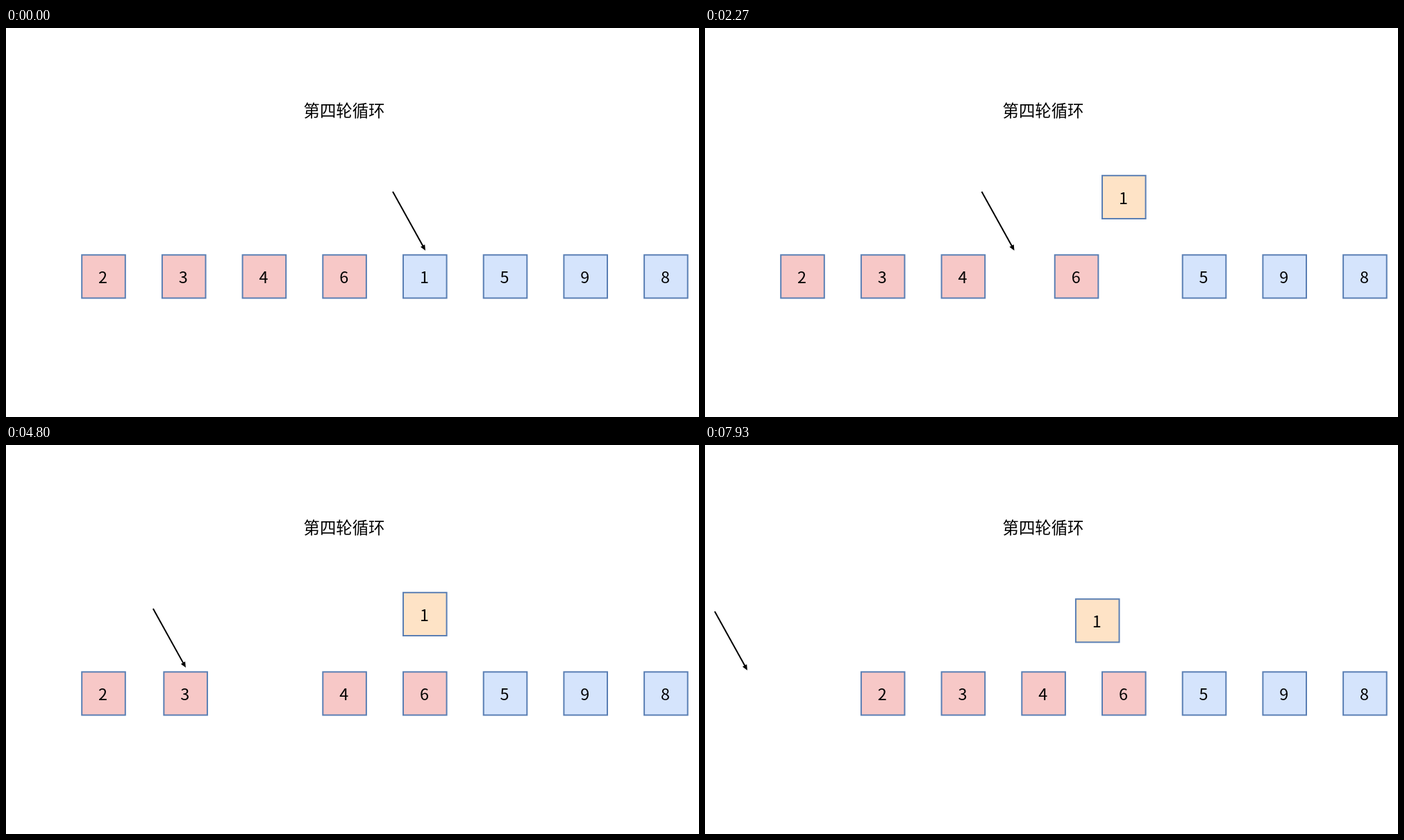
An HTML page for the animation above (8 s loop, 998x561 px).

```html
<!DOCTYPE html>
<html lang="zh-CN">
<head>
<meta charset="utf-8">
<style>
  html, body { margin: 0; width: 100%; height: 100%; overflow: hidden; background: #fff; }
  svg { display: block; width: 998px; height: 561px; }
  text { font: 23.4px "Noto Sans CJK SC", "Noto Sans CJK", sans-serif; text-anchor: middle; }
  rect { stroke: #5a7fb4; stroke-width: 2; }
</style>
</head>
<body>
<svg viewBox="0 0 998 561">
  <text x="487" y="128.2">第四轮循环</text>
  <g id="boxes"></g>
  <g id="arrow">
    <path d="M0 0L43.5 78.6" stroke="#000" stroke-width="2"/>
    <path d="M47 85L46.2 76.3L40 79.7Z"/>
  </g>
</svg>
<script>
const LOOP = 8000, FPS = 15;
const FIRST = 163, PERIOD = 1500, DURATION = 1333;
const ROW = 358.5, RAISED = 244;
const PINK = [247, 200, 199], BLUE = [213, 228, 252], ORANGE = [254, 227, 198];

const slot = i => 140.6 + 115.7 * i;
const mix = (a, b, p) => a + (b - a) * p;

// Progress of move k, accelerating and braking evenly.
function progress(k, t) {
  const u = Math.min(1, Math.max(0, (t - FIRST - PERIOD * k) / DURATION));
  return u < 0.5 ? 2 * u * u : 1 - 2 * (1 - u) ** 2;
}

function follow(points, t) {
  return points.reduce((at, next, k) => at.map((v, i) => mix(v, next[i], progress(k - 1, t))));
}

const svgNode = (name, parent) =>
  parent.appendChild(document.createElementNS("http://www.w3.org/2000/svg", name));

const layer = document.getElementById("boxes");
const arrow = document.getElementById("arrow");

function makeBox(digit, i) {
  const group = svgNode("g", layer), rect = svgNode("rect", group), label = svgNode("text", group);
  for (const [key, value] of Object.entries({ x: -31.4, y: -31.2, width: 62.6, height: 62.2 }))
    rect.setAttribute(key, value);
  label.setAttribute("x", -1);
  label.setAttribute("y", 9.6);
  label.textContent = digit;
  return { i, group, rect };
}

const boxes = [..."23461598"].map(makeBox);
layer.append(boxes[4].group);

const arrowStops = [[557, 236], [444, 236], [333, 236], [214.4, 236], [94, 237.8], [14, 240]];

const place = (node, x, y) => node.setAttribute("transform", `translate(${x} ${y})`);

function draw(t) {
  for (const { i, group, rect } of boxes) {
    let x = slot(i), y = ROW, color = i < 4 ? PINK : BLUE;
    if (i < 4) x += 115.7 * progress(4 - i, t);
    if (i === 4) {
      const lift = progress(0, t), drop = progress(5, t);
      x = mix(x, slot(0), drop);
      y = mix(mix(ROW, RAISED, lift), ROW, drop);
      color = BLUE.map((c, n) => mix(c, ORANGE[n], lift));
    }
    place(group, x, y);
    rect.setAttribute("fill", `rgb(${color.map(Math.round)})`);
  }
  place(arrow, ...follow(arrowStops, t));
}

const start = performance.now();
function tick() {
  const t = (performance.now() - start) % LOOP;
  draw(Math.floor((t + 4) * FPS / 1000) * 1000 / FPS);
  requestAnimationFrame(tick);
}
tick();
</script>
</body>
</html>
```
